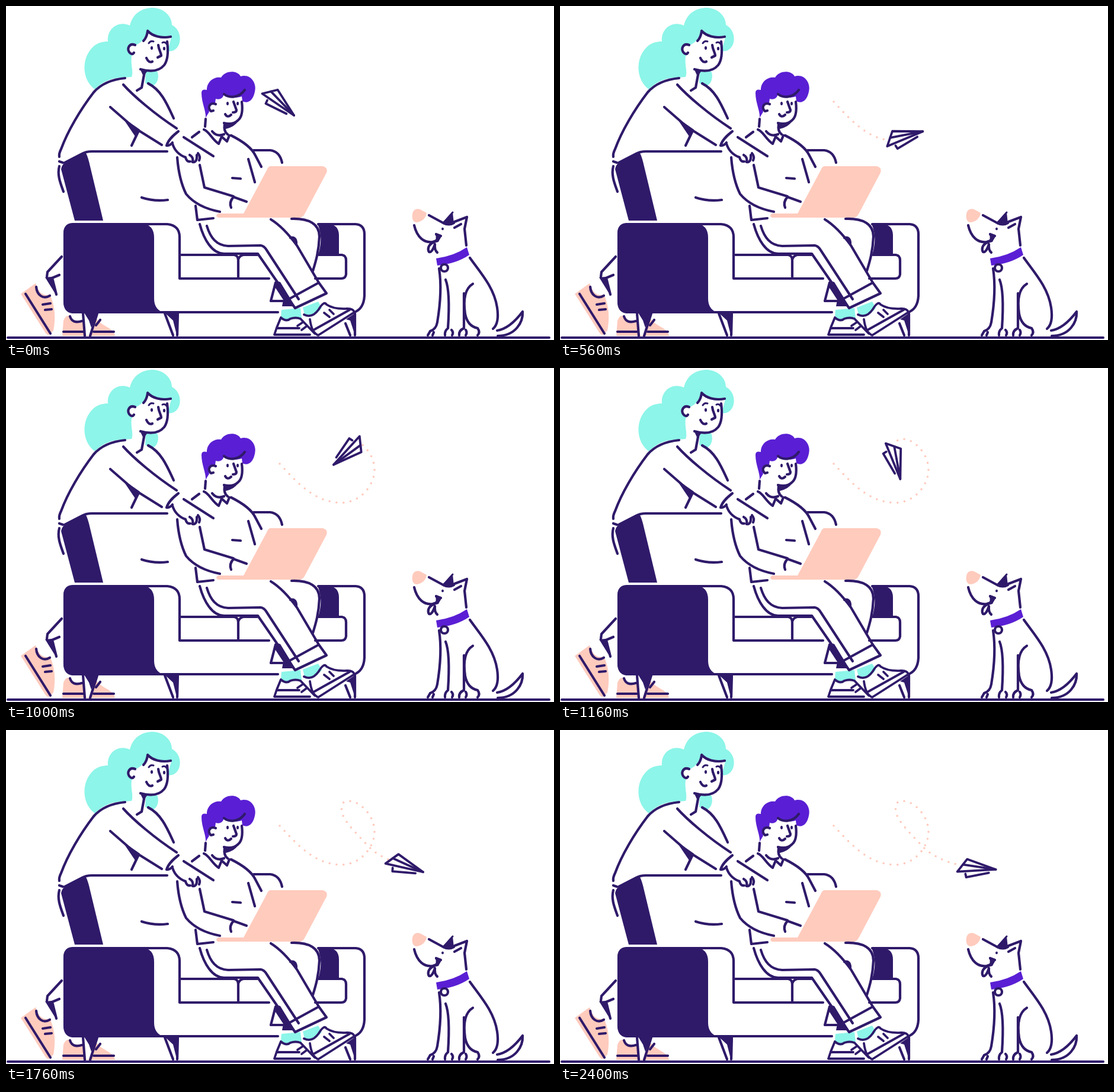
Recreate the animation shown at these times as an HTML page with a canvas. Size 925 by 565 pixels, loop 3120 ms.

```html
<!DOCTYPE html>
<html lang="en">
<head>
<meta charset="utf-8">
<title>Paper plane</title>
<style>
  html, body { margin: 0; width: 100%; height: 100%; overflow: hidden; background: #fff; }
  canvas { display: block; }
</style>
</head>
<body>
<canvas id="stage" width="925" height="565"></canvas>
<script>
const ctx = document.getElementById('stage').getContext('2d');
const INK = '#2f1a6a', PURPLE = '#5a1fd4', MINT = '#8df5e9', PEACH = '#ffcbbd', WHITE = '#fff';
const LOOP = 3120, STEP = 40;

const art = [];
const fill = (color, d) => art.push({ color, path: new Path2D(d) });
const line = (d, width = 4.2) => art.push({ width, path: new Path2D(d) });
const dot = (x, y, rx, ry) => {
  const path = new Path2D();
  path.ellipse(x, y, rx, ry, 0, 0, Math.PI * 2);
  art.push({ color: INK, path });
};

function addWoman() {
  fill(MINT, `M150 141C128 125 126 88 148 68C155 62 164 60 172 60C170 38 190 24 209 33
    C214 12 230 3 248 3C268 4 280 18 280 32C296 40 298 64 286 73C281 77 276 77 273 76
    L240 60L212 85C210 100 216 112 212 120L200 121C180 121 165 126 150 141Z`);
  fill(MINT, 'M236 108C248 112 252 106 256 112C259 124 254 134 245 136L235 130Z');
  fill(WHITE, `M239 42C246 52 262 56 279 53L273 76C274 94 266 112 236 110L232 134L213 121
    C216 112 210 100 213 83C204 78 206 62 219 66C230 62 236 52 239 42Z`);
  line(`M239 42C247 51 262 55 278 52M239 43C238 50 236 55 232 59
    M218 66C208 62 204 72 208 78C211 82 214 82 216 79
    M272 60C274 76 273 92 267 100C257 112 241 111 227 107
    M234 111L229 138L221 143M257 66C258 75 262 79 262 84L256 87
    M237 88Q241 97 247 94`);
  line('M241 63Q244 58 249 60M264 62Q268 60 271 64', 3);
  dot(246, 71, 2.1, 2.9);
  dot(267, 72, 2.1, 2.9);
  fill(INK, 'M226 106L238 111L232 119Z');

  line(`M201 122C180 124 162 130 148 146C125 176 104 212 93 242Q89 250 90 255
    M198 133C215 152 250 182 288 207M176 171L215 205L263 235
    M240 131C262 142 272 166 283 190M224 211L212 236
    M90 263L96 265M90 271C86 286 92 300 97 314`);
  fill(INK, 'M196 188L226 209L219 222Z');
  line(`M291 212C282 219 274 226 271 236Q276 237 281 231
    M300 222L350 254M281 233C285 246 295 253 303 256
    M303 256Q305 264 311 263M310 252Q317 256 315 264Q323 265 322 252M324 249Q329 255 326 261`);

  fill(PEACH, 'M25 487L50 469C54 482 61 492 74 488C83 506 84 530 80 549L73 556Q69 557 66 552Z');
  fill(PEACH, 'M95 558L97 532Q101 522 108 524Q114 537 130 532L154 530C160 541 182 544 184 558Z');
  fill(INK, 'M66 459L78 458L84 488Z');
  line(`M33 487L75 554M94 424L70 450L69 458M78 460L90 455M78 460L85 488
    M51 475C52 489 63 497 74 490M62 505L75 503M66 514L77 513
    M108 525Q112 538 128 533M97 551H131M148 551H182M159 531L152 540`);
}

function addSofa() {
  fill(INK, 'M93 276Q94 268 102 263L134 247Q137 252 140 263L164 363H116Z');
  line(`M99 265L128 250Q135 246 145 246H272M418 244H446Q462 246 466 265
    M229 324Q250 331 273 328`);
  fill(INK, 'M112 368H228Q250 369 250 392V495Q250 512 264 518H114Q97 516 97 500V385Q97 369 112 368Z');
  fill(INK, 'M526 369H546Q562 371 562 388V421H527C533 402 533 385 526 369Z');
  line(`M112 369H272Q293 371 293 391V461H444M112 518H459
    M112 369Q99 370 99 385V500Q99 516 112 518
    M527 369H590Q605 370 605 386V490Q604 512 588 518
    M296 421H385Q392 422 392 430V461M392 429Q394 422 401 421H424
    M528 421H567Q574 422 574 430V454Q573 461 566 461H522`);
  fill(WHITE, 'M130 520H154L141 557H133Z');
  fill(INK, 'M132 519H155L144 544L140 532Z');
  fill(INK, 'M268 519H291L288 556L282 532Z');
  fill(INK, 'M574 530L590 519L589 557L581 532Z');
  line('M130 520L133 558M154 520L142 558M268 520L282 557M290 520L289 557M573 537L581 557M589 520V557');
}

function addReader() {
  fill(PURPLE, `M337 189C338 178 330 164 330 147Q330 140 339 142C339 127 352 119 363 121
    C370 109 390 108 396 119C412 114 424 130 420 145C417 160 408 166 399 161
    L398 153C385 157 375 155 368 149C366 157 360 159 354 157L353 164C344 163 340 170 343 179Z`);
  line(`M368 149C376 156 393 156 403 142M354 166C344 162 339 172 346 178L350 177
    M398 162C400 178 398 188 392 193C385 200 376 200 368 198
    M337 191L336 204M384 162L389 176Q389 180 383 180M370 183Q374 190 380 184`);
  dot(374, 165, 2, 3);
  dot(391, 165, 2, 3);
  fill(INK, 'M366 197Q380 200 392 194Q387 204 371 208Z');
  line(`M334 209C342 211 348 226 359 233L364 221L373 229L377 219
    M348 212Q356 222 368 217M369 200Q367 212 374 217
    M326 213L314 222M380 219C400 229 415 240 421 253L431 272M409 259L420 298
    M289 256C291 282 296 302 304 318C318 335 340 344 361 348
    M327 269L335 307L384 322M406 331L384 323Q376 332 380 341
    M320 338L323 362L350 359M382 291L396 292`);
  fill(PEACH, `M446 271H534Q544 273 541 282L504 352Q501 358 494 358H358Q352 355 358 351H401
    L440 278Q442 272 446 271Z`);

  fill(INK, 'M456 465L463 467L488 508H466L468 497L453 474Z');
  fill(MINT, 'M465 514L497 511L499 528Q488 527 480 530Q472 534 464 526Z');
  fill(MINT, 'M501 510L527 500L533 511Q524 522 514 525L504 522Z');
  line(`M327 369C334 395 348 419 368 419L425 419L478 496
    M339 372C345 392 355 405 375 406L430 405Q436 406 440 413L494 496
    M447 361C465 372 480 390 491 405L528 468
    M477 496L528 468L541 486L488 511Z
    M482 360C512 359 529 369 529 390C528 415 523 432 518 448
    M480 392Q490 390 490 402M455 468L447 499H467`);
  line(`M464 527L457 544L453 556H513M457 545H495M464 527Q473 535 480 529Q489 526 497 529L521 554
    M492 541L501 535M499 548L507 542
    M503 522Q517 529 528 513Q537 498 541 505Q553 513 574 512Q586 511 588 518L527 557
    Q516 553 513 530M521 547L580 514M537 519L546 526M546 514L553 521`, 3.8);
}

function addDog() {
  fill(PEACH, 'M686 351Q689 341 699 344L710 350Q708 363 694 366Q684 366 686 351Z');
  fill(INK, 'M737 366L754 349L756 368Q747 373 737 366Z');
  line(`M714 354L738 367Q748 372 756 367M689 371C694 392 706 401 720 399Q730 397 733 389
    M726 386L734 389M757 375L768 369M757 365L778 357L774 377L777 405
    M721 400C713 404 711 411 714 416Q719 418 724 403Q723 413 728 417`);
  fill(INK, 'M724 385L735 389L730 399L720 402Q729 395 724 385Z');
  line('M754 349L739 366', 3);
  dot(737, 377, 2, 2.2);
  fill(PURPLE, 'M726 427Q756 423 778 408L782 421Q760 436 728 439Z');
  line('M746 443A6 6 0 1 1 734 443A6 6 0 1 1 746 443');
  line(`M783 426C800 450 824 476 829 510C832 530 828 541 822 546
    M829 549C848 546 863 529 872 517C873 535 860 558 830 558
    M731 444C735 470 733 505 728 535Q726 547 716 550L712 557
    M742 463C749 480 748 515 746 545Q740 550 741 557M752 548Q756 552 753 557
    M788 470C773 479 772 500 775 521C778 536 786 543 796 545Q801 552 796 557
    M773 486V545Q764 549 765 557M776 548Q779 552 776 557M722 552L720 557`);
}

addWoman();
addSofa();
addReader();
addDog();
line('M3 561H917', 4);

// Flight route; the dotted trail starts a little way along it.
const route = document.createElementNS('http://www.w3.org/2000/svg', 'path');
route.setAttribute('d', `M445.5 145L462 162C490 192 520 228 567 228C600 227 622 197 622 172
  C622 145 598 120 578 120C566 120 564 130 569 145C575 160 600 184 618 203C635 216 655 225 679 229`);
const routeLength = route.getTotalLength();
const TRAIL_START = 23.7, TRAIL_GAP = 11.9;

// time, distance flown, heading in degrees, position of the tail
const keys = [
  [0, 0, 44.6, 445.5, 145],
  [320, 55, 44, 485.5, 183],
  [800, 233, -115, 623.5, 174],
  [1160, 329, -282, 562.5, 132],
  [1480, 411, -324, 614.5, 194],
  [1760, 457, -337, 651.5, 218],
  [2400, routeLength, -353, 679, 229]
].map(([t, dist, angle, x, y]) => {
  const p = route.getPointAtLength(dist);
  return { t, dist, angle, dx: x - p.x, dy: y - p.y };
});

// Monotone cubic interpolation, at rest at both ends.
function sample(name, t) {
  const rate = i => (keys[i + 1][name] - keys[i][name]) / (keys[i + 1].t - keys[i].t);
  const slope = i => {
    if (i === 0 || i === keys.length - 1) return 0;
    const a = rate(i - 1), b = rate(i);
    return a * b > 0 ? 2 * a * b / (a + b) : 0;
  };
  const last = keys[keys.length - 1];
  if (t >= last.t) return last[name];
  const i = keys.findIndex(k => k.t > t) - 1;
  const from = keys[i], to = keys[i + 1], span = to.t - from.t;
  const u = (t - from.t) / span, v = 1 - u;
  return v * v * (1 + 2 * u) * from[name] + u * u * (3 - 2 * u) * to[name]
    + span * u * v * (v * slope(i) - u * slope(i + 1));
}

const planeBody = new Path2D('M-7 11.5L7 -11.5L57 0Z');
const planeFolds = new Path2D('M1 -1.5L57 0M7 13.5L9 19.2L46 7');

function drawPlane(t) {
  const dist = sample('dist', t);
  ctx.fillStyle = PEACH;
  for (let d = TRAIL_START; d < dist; d += TRAIL_GAP) {
    const p = route.getPointAtLength(d);
    ctx.beginPath();
    ctx.arc(p.x, p.y, 1.8, 0, Math.PI * 2);
    ctx.fill();
  }
  const p = route.getPointAtLength(dist);
  ctx.save();
  ctx.translate(p.x + sample('dx', t), p.y + sample('dy', t));
  ctx.rotate(sample('angle', t) * Math.PI / 180);
  ctx.fillStyle = WHITE;
  ctx.fill(planeBody);
  ctx.lineWidth = 3.8;
  ctx.stroke(planeBody);
  ctx.stroke(planeFolds);
  ctx.restore();
}

function render(now) {
  const t = Math.floor((now % LOOP) / STEP) * STEP;
  ctx.fillStyle = WHITE;
  ctx.fillRect(0, 0, 925, 565);
  ctx.strokeStyle = INK;
  ctx.lineCap = ctx.lineJoin = 'round';
  for (const { color, width, path } of art) {
    if (color) {
      ctx.fillStyle = color;
      ctx.fill(path);
    } else {
      ctx.lineWidth = width;
      ctx.stroke(path);
    }
  }
  drawPlane(t);
}

let start;
function tick(now) {
  start ??= now;
  render(Math.max(0, now - start));
  requestAnimationFrame(tick);
}
render(0);
requestAnimationFrame(tick);
</script>
</body>
</html>
```
